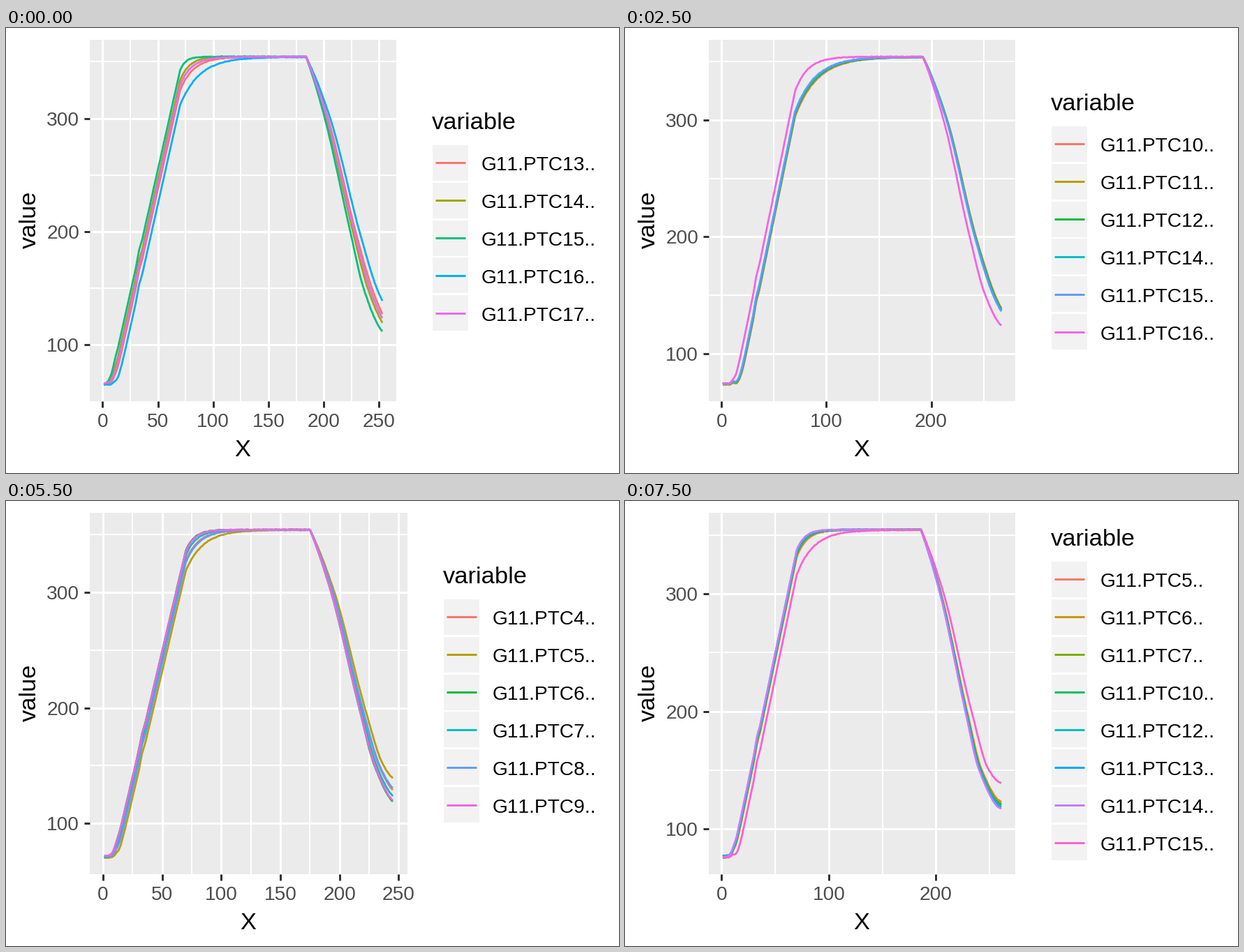
A matplotlib script that plays this animation: 878 by 638 pixels, repeating every 8000 ms.

```python
import numpy as np
import matplotlib.pyplot as plt
from matplotlib.animation import FuncAnimation
from matplotlib.patches import Rectangle

W, H, DPI = 878, 638, 64
PT = 72 / DPI
LEFT, RIGHT, TOP, BOTTOM = 120, 559, 17, 535
SMALL, LARGE = 28.1, 34.4
DIGIT = 0.556 * SMALL
KNEE, KNEE_VALUE, SLOPE, PLATEAU = 70, 342, 4.36, 354.5

plt.rcParams["font.family"] = "Liberation Sans"
plt.rcParams["text.kerning_factor"] = 6


def hcl(hue, c=100, l=65):
    """Polar LUV colour to sRGB, the usual discrete hue scale."""
    a = np.radians(hue)
    u = c * np.cos(a) / (13 * l) + 0.1978
    v = c * np.sin(a) / (13 * l) + 0.4683
    y = ((l + 16) / 116) ** 3
    x = 9 * y * u / (4 * v)
    z = -x / 3 - 5 * y + 3 * y / v
    rgb = np.array([3.2405 * x - 1.5371 * y - 0.4985 * z,
                    -0.9693 * x + 1.8760 * y + 0.0416 * z,
                    0.0556 * x - 0.2040 * y + 1.0572 * z])
    rgb = np.clip(rgb, 0, 1)
    return np.where(rgb > 0.00304, 1.055 * rgb ** (1 / 2.4) - 0.055, 12.92 * rgb)


def end_slope(h0, h1, d0, d1):
    m = ((2 * h0 + h1) * d0 - h0 * d1) / (h0 + h1)
    return m if m * d0 > 0 else 0


def pchip(points, x):
    """Monotone cubic through a few points."""
    px, py = np.array(points, float).T
    h = np.diff(px)
    d = np.diff(py) / h
    w1, w2 = 2 * h[1:] + h[:-1], h[1:] + 2 * h[:-1]
    inner = (w1 + w2) / (w1 / d[:-1] + w2 / d[1:])
    m = np.array([end_slope(h[0], h[1], d[0], d[1]), *inner,
                  end_slope(h[-1], h[-2], d[-1], d[-2])])
    j = np.clip(np.searchsorted(px, x) - 1, 0, len(d) - 1)
    t = (x - px[j]) / h[j]
    return (py[j] * (1 + 2 * t) * (1 - t) ** 2 + m[j] * h[j] * t * (1 - t) ** 2
            + py[j + 1] * t * t * (3 - 2 * t) - m[j + 1] * h[j] * t * t * (1 - t))


def softplus(v, width):
    return width * np.logaddexp(0, v / width)


def bump(x, at):
    return np.maximum(0, 1 - np.abs(x - at) / 3)


def thermal_cycle(x, start, base, lag, end):
    """Heat up, settle on the plateau, cool down; lag delays every phase."""
    n = x[-1]
    flat = PLATEAU - 0.06 * lag
    v = KNEE_VALUE - SLOPE * lag
    up = base + softplus(v - SLOPE * (KNEE - x) - base, 8)
    up += 3 * bump(x, 33) + 1.5 * bump(x, 11)
    settle = flat - (flat - v) * np.exp(-np.maximum(x - KNEE, 0) / (5 + 1.8 * lag))
    down = pchip([(start, flat), (start + 17 + 0.7 * lag, 300),
                  (start + 40 + 1.2 * lag, 200),
                  (min(start + 52 + 1.9 * lag, n - 5), 150), (n, end)],
                 np.maximum(x, start))
    return np.where(x <= KNEE, up, np.where(x <= start, settle, down))


def chart(first, last, n, base, lag_keys=None, skip=(), start=None, spikes=()):
    """lag_keys: a few (series, lag) points, the others lie between them."""
    ids = [k for k in range(first, last + 1) if k not in skip]
    rng = np.random.default_rng(n + len(ids))
    lags = rng.uniform(0, 6, len(ids))
    if lag_keys:
        lags = np.interp(range(len(ids)), *zip(*lag_keys))
    bases = rng.uniform(0, 2, len(ids))
    bases += base - bases.min()
    x = np.arange(1, n + 1)
    curves = []
    for lag, b in zip(lags, bases):
        end = 112 + 27 * lag / lags.max()
        y = thermal_cycle(x, start or n - 70, b, lag, end)
        curves.append(np.clip(y + rng.normal(0, 0.15, n), base, 354.8))
    for series, at, value in spikes:
        curves[series][at - 1] = value
    return ids, curves


CHARTS = [
    chart(13, 17, 253, 64.9, [(0, 4), (2, 0), (3, 7), (4, 3)], start=184),
    chart(10, 15, 257, 64.9),
    chart(10, 15, 243, 74.5, [(0, 1.5), (1, 0.5), (2, 1.2), (3, 6), (5, 3)],
          start=178, spikes=[(5, 141, 347.7)]),
    chart(9, 15, 250, 72),
    chart(10, 15, 258, 78),
    chart(10, 16, 267, 73.4, [(0, 9), (4, 8), (5, 4)], skip=[13], start=192),
    chart(7, 14, 262, 80, skip=[8]),
    chart(6, 15, 249, 77, [(0, 4), (2, 6), (4, 1), (7, 1.5)], skip=[8, 12],
          start=180, spikes=[(0, 18, 27.5), (0, 26, 112), (5, 147, 340), (6, 115, 338)]),
    chart(6, 14, 245, 74, skip=[9]),
    chart(10, 15, 303, 78.6, [(0, 10), (1, 14.5), (3, 1), (4, 4), (5, 0)], start=216),
    chart(10, 15, 270, 76),
    chart(4, 9, 245, 70),
    chart(10, 18, 260, 81.3, [(0, 4), (2, 7.5), (5, 1), (7, 0)], skip=[17],
          start=188, spikes=[(7, 127, 357.1)]),
    chart(10, 15, 260, 79),
    chart(9, 15, 255, 76),
    chart(5, 15, 261, 75.5, [(0, 2.5), (6, 1.2), (7, 6)], skip=[8, 9, 11], start=186),
]

fig = plt.figure(figsize=(W / DPI, H / DPI), dpi=DPI, facecolor="white")
ax = fig.add_axes([0, 0, 1, 1])


def box(x0, y0, x1, y1, color):
    ax.add_patch(Rectangle((x0, y0), x1 - x0, y1 - y0, fc=color, lw=0))


def line(x, y, color, width=3):
    ax.plot(x, y, color=color, lw=width * PT,
            solid_capstyle="butt", solid_joinstyle="round")


def text(x, y, s, size=SMALL, color="black", ha="left", **kw):
    ax.text(x, y, s, fontsize=size * PT, color=color, ha=ha, va="baseline", **kw)


def draw_legend(ids, colors, shift):
    pitch = 53.88
    first = 301 - pitch * (len(ids) - 1) / 2
    text(610 + shift, first - 48, "variable", LARGE)
    for i, (num, color) in enumerate(zip(ids, colors)):
        y = first + i * pitch
        top = round(y - 25.5)
        box(611 + shift, top, 662 + shift, top + 51, "#F2F2F2")
        line([615 + shift, 658 + shift], [y, y], color)
        text(680.6 + shift, y + 11, f"G11.PTC{num}..")


def draw(i):
    ids, curves = CHARTS[i]
    n = len(curves[0])
    lo, hi = np.min(curves), np.max(curves)
    # Short labels leave a narrower legend and a wider panel.
    shift = DIGIT if max(ids) < 10 else 0
    right = RIGHT + shift
    sx = (right - LEFT) / (1.1 * (n - 1))
    sy = (BOTTOM - TOP) / (1.1 * (hi - lo))

    def to_x(v):
        return LEFT + (right - LEFT) / 22 + (v - 1) * sx

    def to_y(v):
        return BOTTOM - (BOTTOM - TOP) / 22 - (v - lo) * sy

    ax.clear()
    ax.axis("off")
    ax.set_xlim(0, W)
    ax.set_ylim(H, 0)
    box(LEFT, TOP, right, BOTTOM, "#EBEBEB")

    step = 50 if n < 256 else 100
    xs = [v for v in range(0, 400, step // 2) if to_x(v) < right]
    ys = [v for v in range(0, 400, 50) if TOP < to_y(v) < BOTTOM]
    for major in (False, True):
        width = 3 if major else 2
        for v in xs:
            if (v % step == 0) == major:
                line([to_x(v)] * 2, [TOP, BOTTOM], "white", width)
        for v in ys:
            if (v % 100 == 0) == major:
                line([LEFT, right], [to_y(v)] * 2, "white", width)

    colors = [hcl(15 + 360 * k / len(ids)) for k in range(len(ids))]
    for y, color in zip(curves, colors):
        line(to_x(np.arange(1, n + 1)), to_y(y), color, 2.8)

    for v in xs:
        if v % step == 0:
            line([to_x(v)] * 2, [BOTTOM, BOTTOM + 8.5], "#333333")
            text(to_x(v), 572, str(v), color="#4D4D4D", ha="center")
    for v in ys:
        if v % 100 == 0:
            line([LEFT - 8.5, LEFT], [to_y(v)] * 2, "#333333")
            text(105, to_y(v) + 10, str(v), color="#4D4D4D", ha="right")
    text((LEFT + right) / 2 - 1, 614, "X", LARGE, ha="center")
    text(43, (TOP + BOTTOM) / 2 - 1, "value", LARGE, ha="center",
         rotation=90, rotation_mode="anchor")
    draw_legend(ids, colors, shift)
    return []


anim = FuncAnimation(fig, draw, frames=len(CHARTS), interval=500,
                     repeat=True, repeat_delay=0, blit=False)
plt.show()
```
